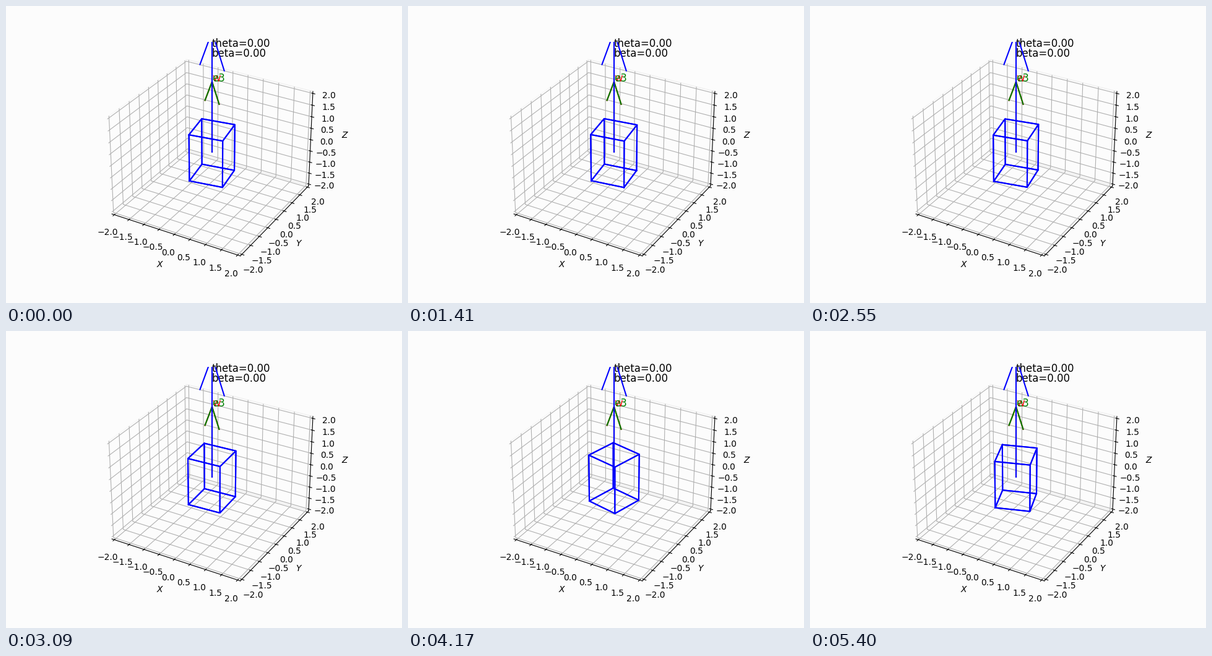
A matplotlib script that plays this animation: 640 px wide and 480 px high, repeating every 5.43 s.

```python
import matplotlib.pyplot as plt
import numpy as np
from matplotlib.animation import FuncAnimation

FRAMES = 181
INTERVAL = 30
FPS = 30
SPIN = 5.0  # rad/s about the vertical axis
LIMIT = 2 + 1 / 12  # small margin beyond the outer ticks
BACK = "#fcfcfc"

fig = plt.figure(figsize=(6.4, 4.8), dpi=100, facecolor=BACK)
ax = fig.add_subplot(projection="3d", facecolor=BACK)
ticks = np.arange(-2, 2.5, 0.5)
ax.set(xlim=(-LIMIT, LIMIT), ylim=(-LIMIT, LIMIT), zlim=(-LIMIT, LIMIT),
       xticks=ticks, yticks=ticks, zticks=ticks,
       xlabel="$X$", ylabel="$Y$", zlabel="$Z$")
for axis in (ax.xaxis, ax.yaxis, ax.zaxis):
    axis.pane.set_fill(False)

# Outlines of the six faces of a 1 x 1 x 2 box
size = np.array([0.5, 0.5, 1.0])
square = np.array([[-1, -1], [1, -1], [1, 1], [-1, 1], [-1, -1]])
faces = [np.insert(square, k, side, axis=1) * size
         for k in range(3) for side in (-1, 1)]
lines = [ax.plot([], [], [], color="blue")[0] for _ in faces]

# Angular velocity, body axis and angular momentum
for length, color in ((3, "red"), (3, "green"), (SPIN, "blue")):
    ax.quiver(0, 0, 0, 0, 0, length, color=color, arrow_length_ratio=0.3)

for z, label, color in ((3, "w", "red"), (3, "e3", "green"),
                        (4.4, "theta=0.00", "black"),
                        (4, "beta=0.00", "black")):
    ax.text(0, 0, z, label, color=color, fontsize=12)


def update(i):
    angle = SPIN * (i + 1) / FPS
    c, s = np.cos(angle), np.sin(angle)
    turn = np.array([[c, -s, 0], [s, c, 0], [0, 0, 1]])
    for line, face in zip(lines, faces):
        line.set_data_3d(*(face @ turn.T).T)
    return lines


anim = FuncAnimation(fig, update, frames=FRAMES, interval=INTERVAL,
                     repeat=True, repeat_delay=0, blit=False)
plt.show()
```
